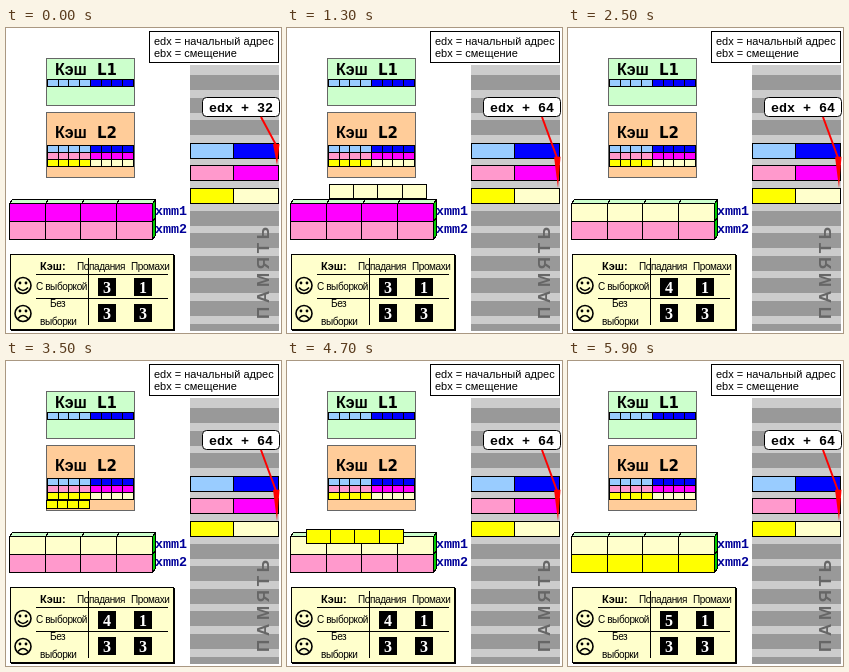
Write an HTML page that moves like this. It is 275 px wide and 305 px high and loops after 6.9 s.

```html
<!DOCTYPE html>
<html lang="ru">
<head>
<meta charset="utf-8">
<title>Кэш</title>
<style>
html, body { margin: 0; width: 100%; height: 100%; overflow: hidden; background: #fff; }
svg { display: block; }
text { font-family: "Liberation Sans", Arial, sans-serif; font-size: 11px; white-space: pre; }
.mono { font: bold 13.33px "Liberation Mono", "Courier New", monospace; }
.head { font: bold 16px "Liberation Sans", Arial, sans-serif; }
.level { font: bold 15px "DejaVu Sans", Verdana, sans-serif; }
.small { font-size: 10px; letter-spacing: -.4px; }
.bold { font-weight: bold; }
.side { font-size: 17px; font-weight: bold; letter-spacing: 3.7px; fill: #666; }
.digit { font: bold 16px "Liberation Serif", "Times New Roman", serif; fill: #fff; text-anchor: middle; }
.navy { fill: #009; }
.line { stroke: #000; }
.soft { stroke: #666; }
.crisp { shape-rendering: crispEdges; }
</style>
</head>
<body>
<svg width="275" height="305" viewBox="0 0 275 305">
  <rect class="crisp" x="184" y="37" width="89" height="266" fill="#ccc"/>
  <g id="stripes" class="crisp" fill="#999"></g>
  <text class="side" transform="translate(262.5 291) rotate(-90)">ПАМЯТЬ</text>

  <rect class="line crisp" x="143.5" y="3.5" width="129" height="31" fill="#fff"/>
  <text x="148" y="17">edx = начальный адрес</text>
  <text x="148" y="29">ebx = смещение</text>

  <rect class="soft crisp" x="40.5" y="30.5" width="88" height="47" fill="#cfc"/>
  <text class="head" x="49" y="47">Кэш<tspan class="level" x="91">L1</tspan></text>
  <rect class="soft crisp" x="40.5" y="84.5" width="88" height="65" fill="#fc9"/>
  <text class="head" x="49" y="110">Кэш<tspan class="level" x="91">L2</tspan></text>

  <g class="line crisp">
    <path d="M3.5 175.5l3-4h143l-3 4z" fill="#cfc"/>
    <path d="M146.5 175.5l3-4v36l-3 4z" fill="#0c0"/>
    <path d="M39.5 175.5l3-4M75.5 175.5l3-4M110.5 175.5l3-4M146.5 193.5l3-4" fill="none"/>
  </g>
  <g id="cells" class="line crisp"></g>
  <text class="mono navy" x="149" y="187">xmm1</text>
  <text class="mono navy" x="149" y="205">xmm2</text>
  <path id="strip" class="line crisp"/>

  <rect class="crisp" x="5" y="227" width="164" height="76"/>
  <rect class="line crisp" x="4.5" y="226.5" width="163" height="75" fill="#ffc"/>
  <path class="line crisp" d="M30 246.5H162M30 270.5H162M82.5 230V297" fill="none"/>
  <text class="bold" x="34" y="242">Кэш:</text>
  <text class="small" x="71" y="242">Попадания</text>
  <text class="small" x="125" y="242">Промахи</text>
  <text class="small" x="30" y="262">С выборкой</text>
  <text class="small" x="44" y="279">Без</text>
  <text class="small" x="34" y="297">выборки</text>
  <g class="crisp">
    <rect x="92" y="250" width="18" height="18"/><rect x="128" y="250" width="18" height="18"/>
    <rect x="92" y="276" width="18" height="18"/><rect x="128" y="276" width="18" height="18"/>
  </g>
  <text id="hits" class="digit" x="101" y="265">3</text>
  <text class="digit" x="137" y="265">1</text>
  <text class="digit" x="101" y="291">3</text>
  <text class="digit" x="137" y="291">3</text>
  <g class="line" fill="none" stroke-width="1.6">
    <circle cx="17" cy="257.5" r="8"/>
    <circle cx="17" cy="285.5" r="8"/>
    <path d="M12 259.5q5 6 10 0M12 290.5q5-6 10 0"/>
  </g>
  <circle cx="14" cy="255" r="1.4"/><circle cx="20" cy="255" r="1.4"/>
  <circle cx="14" cy="283" r="1.4"/><circle cx="20" cy="283" r="1.4"/>

  <rect class="line" x="196.5" y="69.5" width="77" height="19" rx="4" fill="#fff"/>
  <text class="mono" x="203" y="84">edx + <tspan id="offset">32</tspan></text>
  <path id="shaft" stroke="#f00" stroke-width="2"/>
  <path id="tip" fill="#f00"/>
</svg>
<script>
const LOOP = 6900;
const PALE = "#9cf", BLUE = "#00f", PINK = "#f9c", MAGENTA = "#f0f", YELLOW = "#ff0", CREAM = "#ffc";
const $ = id => document.getElementById(id);

function add(parent, tag, attrs) {
  const el = document.createElementNS("http://www.w3.org/2000/svg", tag);
  for (const name in attrs) el.setAttribute(name, attrs[name]);
  return parent.appendChild(el);
}

// Outline of a row of n cells, lines centred on pixels
function row(x, y, w, h, n) {
  let d = `M${x + .5} ${y + .5}h${w}v${h}h${-w}z`;
  for (let i = 1; i < n; i++) d += `M${Math.ceil(x + w * i / n - .5) + .5} ${y + .5}v${h}`;
  return d;
}

const cells = (x, y, w, h, n, fill) => add($("cells"), "path", { d: row(x, y, w, h, n), fill });

function cacheRow(y, left, right) {
  cells(41, y, 43, 7, 4, left);
  cells(84, y, 43, 7, 4, right);
}

// Memory rows share one pitch; three of them hold data
const memRow = i => Math.round(47 + 22.6 * i);
for (let i = 0; memRow(i) < 303; i++)
  add($("stripes"), "rect", { x: 184, y: memRow(i), width: 89, height: Math.min(15, 303 - memRow(i)) });

cacheRow(51, PALE, BLUE);
[[PALE, BLUE], [PINK, MAGENTA], [YELLOW, CREAM]].forEach(([left, right], i) => {
  cacheRow(117 + 7 * i, left, right);
  const y = memRow(i + 3);
  cells(184, y, 43, 15, 1, left);
  cells(227, y, 45, 15, 1, right);
});
const xmm1 = cells(3, 175, 143, 18, 4, MAGENTA);
const xmm2 = cells(3, 193, 143, 18, 4, PINK);

// Flying strip: start time, left, top, width, height
const flights = [
  [500, 74, 139, 57, 9], [900, 52, 147, 83, 12], [1300, 42, 156, 97, 14], [1700, 18, 166, 124, 16],
  [3500, 40, 139, 43, 8], [3900, 35, 147, 57, 9], [4300, 25, 156, 83, 12],
  [4700, 19, 168, 97, 14], [5100, 7, 180, 124, 16]
];

// The arrow stretches downwards, head included
function aim(y) {
  const neck = 89 + (y - 89) * .56;
  $("shaft").setAttribute("d", `M255 89L270 ${neck + 1}`);
  $("tip").setAttribute("d", `M267 ${neck}H273.5L271 ${y}z`);
}

const start = performance.now();
function draw() {
  const t = (performance.now() - start) % LOOP;
  const moved = t >= 100;
  $("offset").textContent = moved ? "64" : "32";
  aim(moved ? 160 : 137);
  xmm1.setAttribute("fill", t < 2100 ? MAGENTA : CREAM);
  xmm2.setAttribute("fill", t < 5500 ? PINK : YELLOW);
  $("hits").textContent = t < 2500 ? 3 : t < 5900 ? 4 : 5;
  const now = flights.find(([from]) => t >= from && t < from + 400);
  if (now) {
    const [from, ...box] = now;
    $("strip").setAttribute("d", row(...box, 4));
    $("strip").setAttribute("fill", from < 3500 ? CREAM : YELLOW);
  }
  $("strip").setAttribute("visibility", now ? "visible" : "hidden");
  requestAnimationFrame(draw);
}
draw();
</script>
</body>
</html>
```
